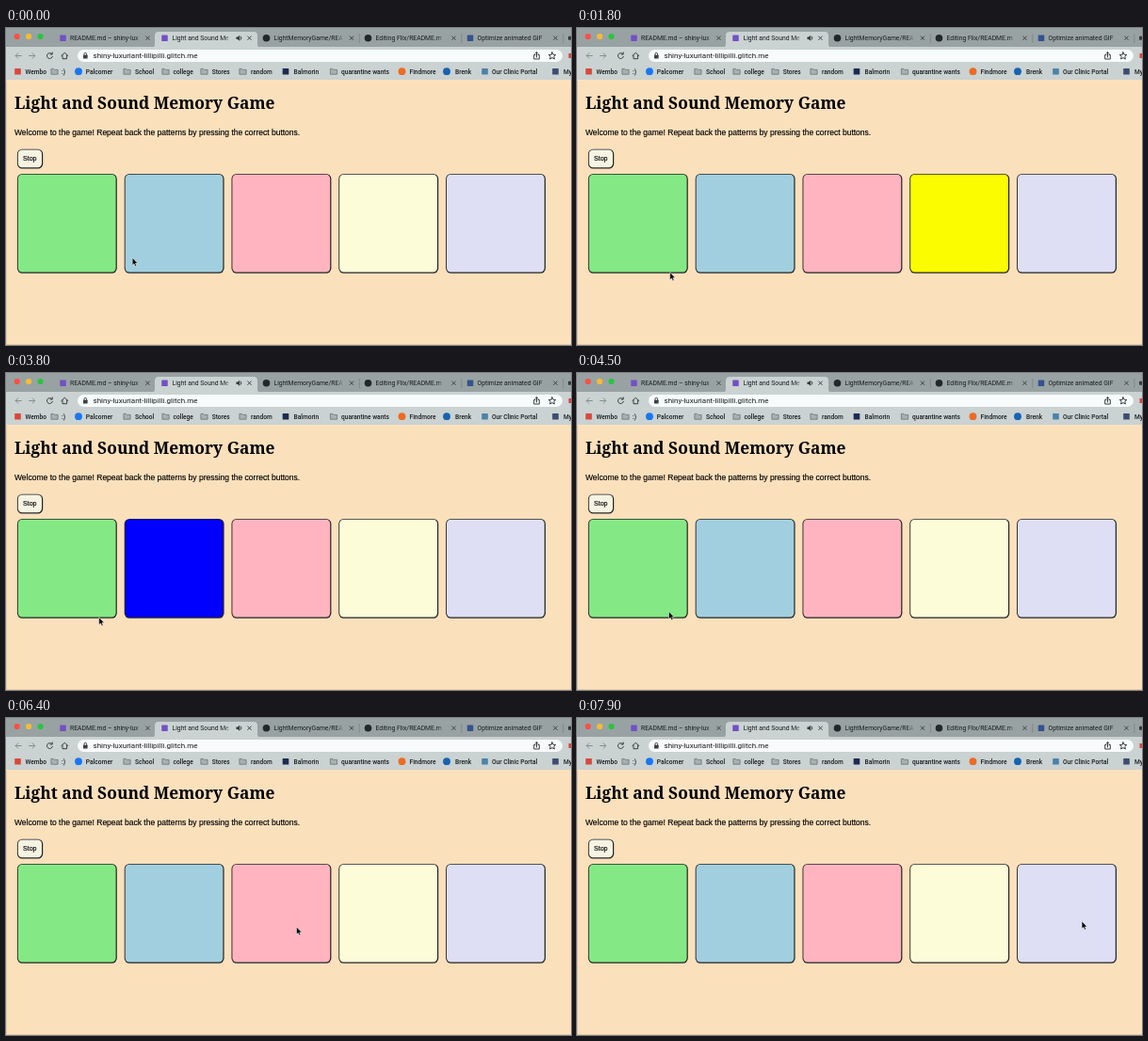
Recreate the animation shown at these times as an HTML page. Size 600x337 px, loop 8 s.

```html
<!DOCTYPE html>
<html lang="en">
<head>
<meta charset="utf-8">
<title>Light and Sound Memory Game</title>
<style>
  html, body { margin: 0; width: 100%; height: 100%; overflow: hidden; background: #fbe0bc; }
  svg { display: block; width: 600px; height: 337px; }
  .ui { font-family: Roboto, "Open Sans", sans-serif; fill: #171c1e; }
  .tab { font-size: 6.8px; }
  .mark { font-size: 6.6px; font-weight: 500; }
  .url { font-size: 8px; }
  .page { font-family: "Liberation Sans", Arial, sans-serif; font-size: 8.5px; stroke: #000; stroke-width: .15; }
  .title { font-family: "Noto Serif", serif; font-weight: 700; font-size: 17.38px; }
  .line { fill: none; stroke: #394143; stroke-width: 1; stroke-linecap: round; stroke-linejoin: round; }
</style>
</head>
<body>
<svg id="stage" viewBox="0 0 600 337" xmlns="http://www.w3.org/2000/svg">
  <defs>
    <linearGradient id="fadeIdle"><stop offset="0" stop-color="#98a2a3" stop-opacity="0"/><stop offset="1" stop-color="#98a2a3"/></linearGradient>
    <linearGradient id="fadeActive"><stop offset="0" stop-color="#cad2d2" stop-opacity="0"/><stop offset="1" stop-color="#cad2d2"/></linearGradient>
  </defs>
  <rect width="600" height="337" fill="#fbe0bc"/>
  <rect width="600" height="21" fill="#98a2a3"/>
  <rect y="20" width="600" height="35" fill="#cad2d2"/>
  <path d="M154 21Q158 21 158 17V8Q158 4 162 4H263Q267 4 267 8V17Q267 21 271 21Z" fill="#cad2d2"/>
  <g id="tabs"></g>

  <!-- toolbar -->
  <g class="line">
    <path d="M16.3 29.5H10.3M12.8 26.8L10.1 29.5L12.8 32.2M24.6 29.5H30.6M28.1 26.8L30.8 29.5L28.1 32.2" stroke="#858f91"/>
    <path d="M48.8 27.6A3 3 0 1 0 49.4 30.3M49.2 25.9V28H47"/>
    <path d="M58.8 29.5L62.3 26.3L65.8 29.5M60 29V32.7H64.6V29"/>
  </g>
  <rect x="76" y="23" width="515" height="13" rx="6.5" fill="#f8fbfb"/>
  <rect x="82" y="28.8" width="4.6" height="3.8" rx=".5" fill="#394143"/>
  <path class="line" d="M83 29V27.7A1.3 1.3 0 0 1 85.6 27.7V29" stroke-width=".8"/>
  <text class="ui url" x="92.5" y="32.2">shiny-luxuriant-lillipilli.glitch.me</text>
  <g class="line" stroke-width=".8">
    <path d="M562 28.5H560.7V33H566.3V28.5H565M563.5 31V25.8M562 27.2L563.5 25.7L565 27.2"/>
    <path d="M580 25.8L581.1 28.3L583.8 28.5L581.8 30.3L582.4 33L580 31.6L577.6 33L578.2 30.3L576.2 28.5L578.9 28.3Z"/>
  </g>
  <rect x="597.5" y="27" width="2.5" height="5" fill="#d8453e"/>
  <g id="marks"></g>

  <!-- page -->
  <text class="title" x="9" y="86.3">Light and Sound Memory Game</text>
  <text class="page" x="9" y="114">Welcome to the game! Repeat back the patterns by pressing the correct buttons.</text>
  <g id="buttons"></g>
  <text class="page" x="18" y="141.3" style="font-size:7.07px">Stop</text>
  <path d="M.3 56V337M0 336.7H600" stroke="#c4b092" stroke-width=".6"/>
  <path id="cursor" d="M0 0V8L1.8 6.4L3 9.1L4.4 8.5L3.2 5.9H5.6Z" fill="#000" stroke="#fff" stroke-width=".5"/>
</svg>
<script>
const LOOP = 8000, STEP = 100;
const $ = id => document.getElementById(id);

function add(parent, tag, attrs, text) {
  const el = document.createElementNS("http://www.w3.org/2000/svg", tag);
  for (const key in attrs) el.setAttribute(key, attrs[key]);
  if (text) el.textContent = text;
  parent.appendChild(el);
  return el;
}
const dot = (g, cx, cy, r, fill) => add(g, "circle", { cx, cy, r, fill });
const square = (g, cx, cy, size, fill) =>
  add(g, "rect", { x: cx - size / 2, y: cy - size / 2, width: size, height: size, rx: .6, fill });

// window controls and tabs
const tabs = $("tabs");
["#ff4f45", "#f8bb2f", "#2ac440"].forEach((c, i) => dot(tabs, 11.7 + i * 12.4, 9, 3.1, c));

// icon x, text x, label, fade end, close x, icon colour, round icon
[
  [60.5, 68, "README.md – shiny-lux", 146, 150.5, "#7350c4", 0],
  [168.5, 176.5, "Light and Sound Me", 240, 258.5, "#7350c4", 0],
  [276.5, 284.5, "LightMemoryGame/REA", 359, 367, "#22272a", 1],
  [384.5, 392.5, "Editing Flix/README.m", 467, 475.5, "#22272a", 1],
  [493, 500.5, "Optimize animated GIF", 0, 583.5, "#35528e", 0]
].forEach(([ix, tx, label, end, cx, color, round], i) => {
  round ? dot(tabs, ix, 10.7, 3.8, color) : square(tabs, ix, 10.7, 6.5, color);
  add(tabs, "text", { class: "ui tab", x: tx, y: 13.1 }, label);
  if (end) {
    const active = i === 1;
    add(tabs, "rect", { x: end - 9, y: 5, width: 9, height: 12, fill: `url(#fade${active ? "Active" : "Idle"})` });
    add(tabs, "rect", { x: end - .1, y: 5, width: 8, height: 12, fill: active ? "#cad2d2" : "#98a2a3" });
  }
  add(tabs, "path", { class: "line", d: `M${cx - 1.8} 8.9l3.6 3.6m0 -3.6l-3.6 3.6`, "stroke-width": .8 });
  if (i > 1) add(tabs, "path", { d: `M${cx + 8.3} 6V16`, stroke: "#6f7a7b", "stroke-width": .6 });
});
add(tabs, "path", { d: "M244.5 9.5H246L248.2 7.7V13.7L246 11.9H244.5Z", fill: "#333b3d" });
add(tabs, "path", { class: "line", d: "M249.4 9.2Q250.6 10.7 249.4 12.2", "stroke-width": .7 });
square(tabs, 599, 10.7, 4, "#333b3d");

// bookmarks: icon x, text x, label, icon kind, colour
const marks = $("marks");
[
  [12.5, 20.5, "Wembo", "square", "#d9483b"],
  [51.5, 59, ":)", "folder"],
  [77, 84.8, "Palcorner", "dot", "#1877f2"],
  [128.5, 137, "School", "folder"],
  [169.5, 177.5, "college", "folder"],
  [210.5, 218.7, "Stores", "folder"],
  [251.5, 260, "random", "folder"],
  [297, 305.5, "Balmorin", "square", "#1d2b52"],
  [348, 356, "quarantine wants", "folder"],
  [420.5, 428.5, "Findmore", "dot", "#ee6b22"],
  [468, 477, "Brenk", "dot", "#1763b0"],
  [508.5, 516, "Our Clinic Portal", "square", "#4b83a8"],
  [583.5, 592, "My", "square", "#3c4d70"]
].forEach(([ix, tx, label, kind, color]) => {
  if (kind === "dot") dot(marks, ix, 46.2, 3.9, color);
  else if (kind === "square") square(marks, ix, 46.2, 6.6, color);
  else add(marks, "path", {
    d: `M${ix - 3.6} 43.4h2.6l1 1h3.6v4.8h-7.2Z`, fill: "#a8b0b1", stroke: "#626c6e", "stroke-width": .7
  });
  add(marks, "text", { class: "ui mark", x: tx, y: 48.6 }, label);
});

// bevelled button: slightly heavier edge on the right and bottom
function bevel(x, y, w, h, r, fill) {
  const g = $("buttons");
  add(g, "rect", { x, y, width: w, height: h, rx: r, fill: "#202324" });
  return add(g, "rect", { x: x + .9, y: y + .9, width: w - 2.1, height: h - 2.1, rx: r - 1, fill });
}
bevel(11.9, 128.7, 27.3, 20.8, 5.2, "#f6f3e3");

const idle = ["#84e984", "#a1cfdf", "#ffb4c0", "#fcfcd9", "#dedef4"];
const lit = ["#007600", "#0000ff", "#ff0000", "#fcfc00", "#8000c0"];
const pads = idle.map((c, i) => bevel(11.9 + i * 113.8, 154.9, 105.9, 105.9, 5.5, c));

// pad, on, off
const lights = [[3, 1400, 2100], [2, 2400, 3100], [1, 3500, 4200], [0, 5200, 5500]];

// time, x, y of the pointer tip
const path = [
  [0, 134.2, 244.2], [600, 98.7, 259.7], [4300, 98.7, 259.7], [5000, 92.7, 229],
  [5500, 92.7, 229], [6300, 308.5, 222], [6600, 308.5, 222], [7600, 536.1, 216], [8000, 536.1, 216]
];
const ease = p => p * p * (3 - 2 * p);

function pointerAt(t) {
  const i = path.findIndex(p => p[0] > t);
  const [t0, x0, y0] = path[i - 1], [t1, x1, y1] = path[i];
  const p = ease((t - t0) / (t1 - t0));
  return [x0 + (x1 - x0) * p, y0 + (y1 - y0) * p];
}

function draw(now) {
  const t = Math.floor((now % LOOP) / STEP) * STEP;
  pads.forEach((pad, i) => {
    const on = lights.some(([n, a, b]) => n === i && t >= a && t < b);
    pad.setAttribute("fill", on ? lit[i] : idle[i]);
  });
  $("cursor").setAttribute("transform", `translate(${pointerAt(t)})`);
}

let start;
function frame(now) {
  start ??= now;
  draw(Math.max(0, now - start));
  requestAnimationFrame(frame);
}
draw(0);
requestAnimationFrame(frame);
</script>
</body>
</html>
```
